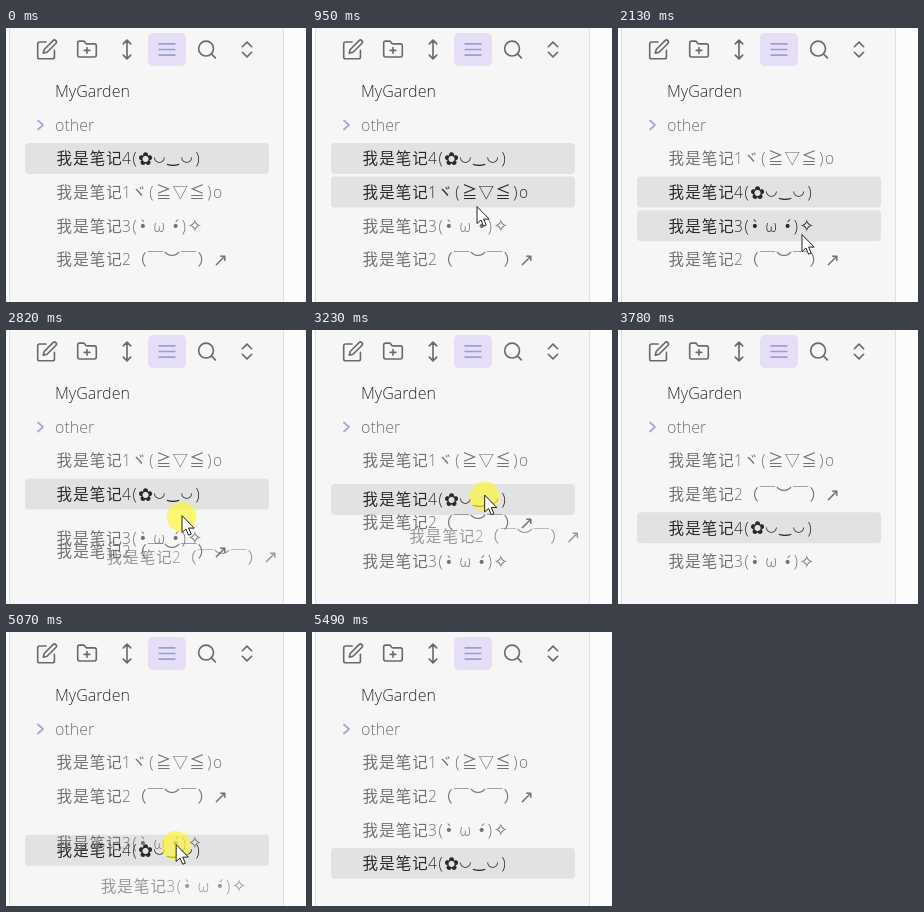
An HTML page with a canvas for the animation above (6420 ms loop, 300 px wide and 274 px high).

```html
<!DOCTYPE html>
<html lang="zh">
<head>
<meta charset="utf-8">
<style>
html, body { margin: 0; width: 100%; height: 100%; overflow: hidden; background: #f6f6f6; }
canvas { display: block; width: 300px; height: 274px; }
</style>
</head>
<body>
<canvas id="stage"></canvas>
<script>
const W = 300, H = 274, LOOP = 6420, STEP = 70, SWAP = 220;
const canvas = document.getElementById('stage');
const ctx = canvas.getContext('2d');
const dpr = window.devicePixelRatio || 1;
canvas.width = W * dpr;
canvas.height = H * dpr;

const CJK = '"Noto Sans CJK SC Light", "Noto Sans CJK SC DemiLight", "Noto Sans CJK SC", "Noto Sans CJK", sans-serif';
const LATIN = '"Open Sans Light", "Open Sans", sans-serif';
const SYMBOL = '"DejaVu Sans", sans-serif';
const DIM = '#727272', DARK = '#2a2a2a', ICON = '#6b6870';

// Notes in their first order
const notes = ['我是笔记4(✿◡‿◡)', '我是笔记1ヾ(≧▽≦)o', '我是笔记3(•̀ ω •́)✧', '我是笔记2（￣︶￣）↗'];
const [FOUR, ONE, THREE, TWO] = [0, 1, 2, 3];

const drags = [
  { note: ONE, press: 1080, lift: 1150, drop: 1780 },
  { note: TWO, press: 2540, lift: 2610, drop: 3780 },
  { note: THREE, press: 4650, lift: 4790, drop: 5490 }
];
const swaps = [[1320, ONE, FOUR], [2755, TWO, THREE], [3195, TWO, FOUR], [4935, THREE, FOUR]];

// Pointer keys (time, x, y), one list per visible stretch
const paths = [
  [[390, 275, 227], [950, 165, 179], [1080, 165, 178], [1430, 174, 136], [1780, 177, 132],
   [2130, 184, 207], [2340, 181, 241], [2540, 181, 241], [2820, 176, 186], [3160, 173, 166], [3780, 170, 161]],
  [[4370, 172, 212], [4720, 166, 237], [5000, 170, 214], [5490, 171, 207]]
];

// Each stretch of activity advances in even steps from its start
const starts = [390, 1080, 1780, 2540, 3230, 3780, 4370, 5070, 5490];
function snap(t) {
  const s = starts.filter(v => v <= t).pop();
  return s ? s + Math.floor((t - s) / STEP) * STEP : 0;
}

const clamp = v => Math.max(0, Math.min(1, v));
const mix = (a, b, u) => a + (b - a) * u;
const rowY = slot => 130.7 + slot * 33.6;

function pointer(t) {
  for (const path of paths) {
    const i = path.findIndex(k => k[0] > t);
    if (i < 1) continue;
    const [t0, x0, y0] = path[i - 1], [t1, x1, y1] = path[i];
    const u = (t - t0) / (t1 - t0);
    return { x: mix(x0, x1, u), y: mix(y0, y1, u) };
  }
  return null;
}

function slotsAt(t) {
  const slots = notes.map((_, i) => i);
  for (const [start, a, b] of swaps) {
    const u = clamp((t - start) / SWAP), sa = slots[a], sb = slots[b];
    slots[a] = mix(sa, sb, u);
    slots[b] = mix(sb, sa, u);
  }
  return slots;
}

// Cell width, font and vertical shift by kind of glyph
function glyphStyle(ch) {
  if (/[◡‿]/.test(ch)) return { w: 13.7, font: `bold 14px ${SYMBOL}`, dy: ch === '◡' ? -3 : -1 };
  if (/[✿✧↗]/.test(ch)) return { w: 13.7, font: `${ch === '✿' ? 'bold ' : ''}18px ${SYMBOL}`, dy: 0.5 };
  if (/•/.test(ch)) return { w: 8.2, font: `14px ${SYMBOL}`, dy: -0.5 };
  if (/[\x20-\x7eω]/.test(ch)) return { w: 8.2, font: `300 15.5px ${LATIN}`, dy: 0 };
  return { w: 16.6, font: `300 15.5px ${CJK}`, dy: 0 };
}

function drawNote(str, x, y, color) {
  ctx.fillStyle = color;
  ctx.textAlign = 'center';
  for (const ch of str.match(/.\p{M}?/gu)) {
    const { w, font, dy } = glyphStyle(ch);
    ctx.font = font;
    ctx.fillText(ch, x + w / 2, y + 5.7 + dy);
    x += w;
  }
}

function label(str, y, color) {
  ctx.fillStyle = color;
  ctx.textAlign = 'left';
  ctx.font = `300 16px ${LATIN}`;
  ctx.fillText(str, 49, y);
}

function box(x, y, w, h, r, color) {
  ctx.fillStyle = color;
  ctx.beginPath();
  ctx.roundRect(x, y, w, h, r);
  ctx.fill();
}

function line(d, color, width) {
  ctx.strokeStyle = color;
  ctx.lineWidth = width;
  ctx.lineCap = ctx.lineJoin = 'round';
  ctx.stroke(new Path2D(d));
}

const icons = [
  'M11 4H4a2 2 0 0 0-2 2v14a2 2 0 0 0 2 2h14a2 2 0 0 0 2-2v-7M18.5 2.5a2.1 2.1 0 0 1 3 3L12 15l-4 1 1-4Z',
  'M12 10v6M9 13h6M20 20a2 2 0 0 0 2-2V8a2 2 0 0 0-2-2h-7.9a2 2 0 0 1-1.7-.9L9.6 3.9A2 2 0 0 0 7.9 3H4a2 2 0 0 0-2 2v13a2 2 0 0 0 2 2Z',
  'M12 2v20M8 18l4 4 4-4M8 6l4-4 4 4',
  'M3.5 6h17M3.5 12h17M3.5 18h17',
  'M19 11a8 8 0 1 1-16 0a8 8 0 1 1 16 0M21 21l-4.3-4.3',
  'M7 15l5 5 5-5M7 9l5-5 5 5'
];
const ACTIVE = 3;

function panel() {
  box(0, 0, W, H, 0, '#fcfcfc');
  box(3, 0, 275, H, 0, '#e0e0e0');
  box(4, 0, 273, H, 0, '#f6f6f6');
  box(142, 5, 38, 33, 5, '#e5def6');
  icons.forEach((d, i) => {
    ctx.save();
    ctx.translate(41 + 40 * i, 21.5);
    ctx.scale(0.93, 0.93);
    ctx.translate(-12, -12);
    line(d, i === ACTIVE ? '#9a9fd2' : ICON, 1.75);
    ctx.restore();
  });
  label('MyGarden', 69, '#2e2e2e');
  label('other', 102.5, DIM);
  line('M32 92.5l5 4.5-5 4.5', '#a9a9d0', 1.8);
}

const ARROW = new Path2D('M0 0V16.5L3.9 13L6.6 19.2L9.2 18.1L6.6 12.1H11.8Z');

function drawPointer(tip, pressed) {
  ctx.save();
  ctx.translate(tip.x, tip.y);
  if (pressed) {
    ctx.fillStyle = 'rgba(255, 246, 50, 0.66)';
    ctx.beginPath();
    ctx.arc(-0.5, 0.8, 14.8, 0, Math.PI * 2);
    ctx.fill();
  }
  ctx.fillStyle = '#fff';
  ctx.fill(ARROW);
  line('M0 0V16.5L3.9 13L6.6 19.2L9.2 18.1L6.6 12.1H11.8Z', '#222', 1);
  ctx.restore();
}

function draw(t) {
  ctx.setTransform(dpr, 0, 0, dpr, 0, 0);
  panel();
  const tip = pointer(t);
  const drag = drags.find(d => t >= d.press && t < d.drop);
  const lifted = drag && t >= drag.lift;
  const over = tip && !lifted && tip.x < 263 ? Math.round((tip.y - rowY(0)) / 33.6) : -1;

  const slots = slotsAt(t);
  const lit = slots.map((s, i) => i === FOUR || Math.round(s) === over);
  slots.forEach((s, i) => lit[i] && box(19, rowY(s) - 15.7, 244, 31, 4, '#e2e2e2'));
  slots.forEach((s, i) => drawNote(notes[i], 50, rowY(s), lit[i] ? DARK : DIM));

  if (lifted) {
    ctx.globalAlpha = 0.7;
    drawNote(notes[drag.note], tip.x - 76, tip.y + 41, DIM);
    ctx.globalAlpha = 1;
  }
  if (tip) drawPointer(tip, drag);
}

const began = performance.now();
function tick() {
  draw(snap((performance.now() - began) % LOOP));
  requestAnimationFrame(tick);
}
tick();
</script>
</body>
</html>
```
